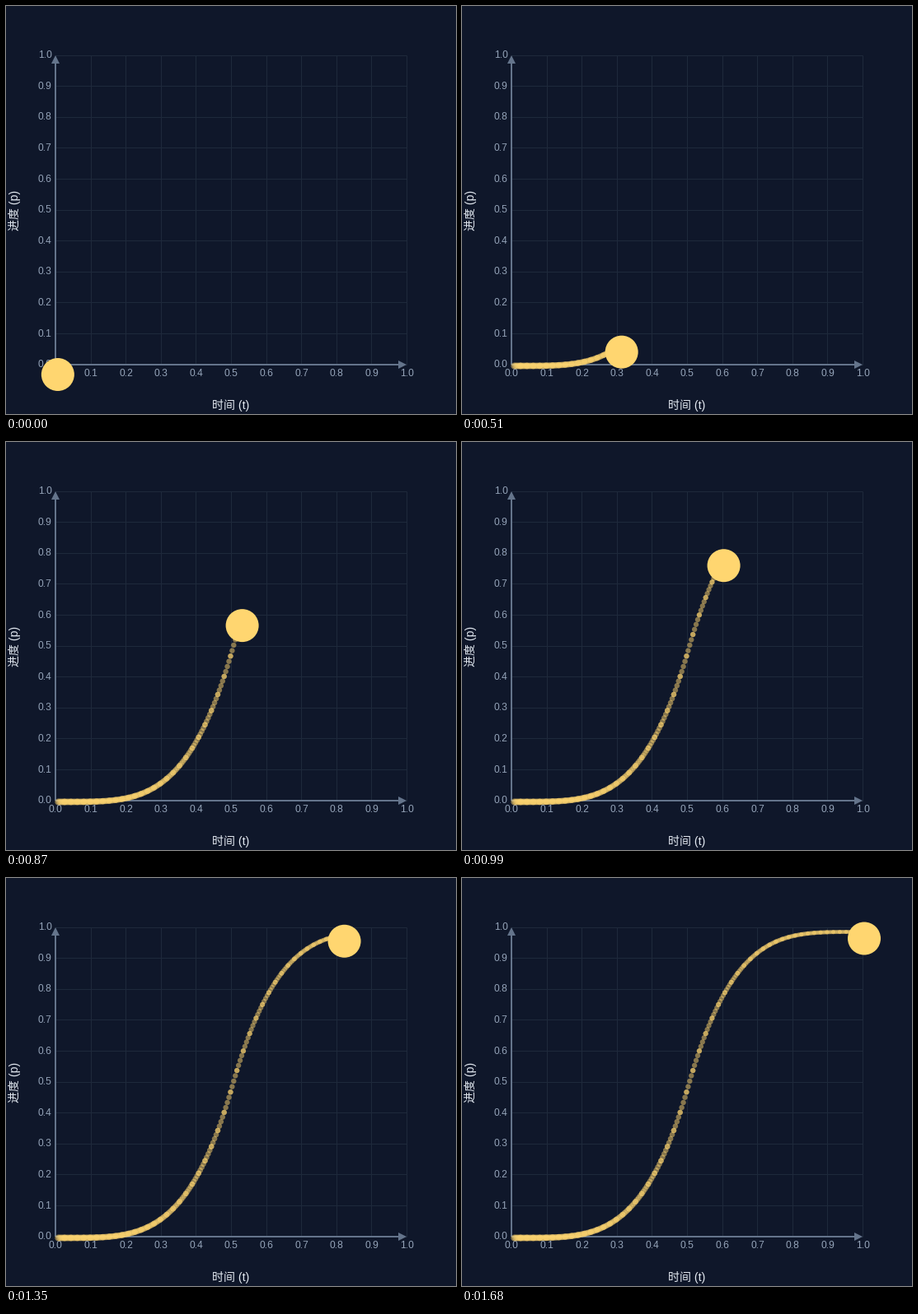
A matplotlib script that plays this animation: 546 px wide and 496 px high, repeating every 1710 ms.

```python
import numpy as np
import matplotlib.pyplot as plt
from matplotlib.animation import FuncAnimation
from matplotlib.patches import Circle, Polygon

W, H, DPI = 546, 496, 100
PX = 72 / DPI  # points per pixel
FRAMES, STEP = 57, 30
LAST = 55  # the ball arrives here and rests

BG, GRID, AXIS = "#0f172a", "#1e293b", "#64748b"
TICK, LABEL, GOLD = "#94a3b8", "#e2e8f0", "#ffd670"
LEFT, RIGHT, TOP, BOTTOM = 60, 486, 59.5, 435.5
SUB, LEAD = 4, 0.17  # trail dots per step, trail's head start in steps

plt.rcParams["font.family"] = ["Liberation Sans", "Noto Sans CJK JP"]

fig = plt.figure(figsize=(W / DPI, H / DPI), dpi=DPI, facecolor=BG)
ax = fig.add_axes([0, 0, 1, 1])
ax.set_xlim(0, W)
ax.set_ylim(H, 0)
ax.axis("off")


def ease(t):
    """Quartic ease in and out."""
    return np.where(t < 0.5, 8 * t**4, 1 - 8 * (1 - t) ** 4)


def line(xs, ys, color, width):
    ax.plot(xs, ys, color=color, lw=width * PX, solid_capstyle="butt", zorder=1)


def text(x, y, s, size, color, **kw):
    ax.text(x, y, s, fontsize=size * PX, color=color, zorder=2, **kw)


def draw_chart():
    for i in range(11):
        x = LEFT + (RIGHT - LEFT) * i / 10
        y = BOTTOM - (BOTTOM - TOP) * i / 10
        line([x, x], [TOP, BOTTOM], GRID, 1)
        line([LEFT, RIGHT], [y, y], GRID, 1)
        s = f"{i / 10:.1f}"
        text(x + 0.4, 450.4, s, 12, TICK, ha="center", va="baseline")
        text(55.5, y + 3.8, s, 12, TICK, ha="right", va="baseline")
    line([LEFT, LEFT], [436, 66], AXIS, 2)
    line([LEFT, 480], [436, 436], AXIS, 2)
    for tip in ([(60, 60), (55, 70), (65, 70)], [(486, 436), (476, 431), (476, 441)]):
        ax.add_patch(Polygon(tip, fc=AXIS, lw=0, zorder=2))
    text(273, 490, "时间 (t)", 14, LABEL, ha="center", va="baseline")
    text(10, 248, "进度 (p)", 14, LABEL, ha="center", va="center", rotation=90)


draw_chart()

# Each step leaves a run of dots, both ends included, so joints look brighter.
starts = np.arange(LAST + 1)[:, None]
t_dots = np.clip((starts + np.arange(SUB + 1) / SUB + LEAD) / LAST, 0, 1).ravel()
dots = np.column_stack([62 + 426 * t_dots, 437.5 - 372 * ease(t_dots)])
sizes = (2 * (4 - 1.6 * t_dots) * PX) ** 2

trail = ax.scatter([], [], c=GOLD, alpha=0.5, linewidths=0, zorder=3)
ball = ax.add_patch(Circle((0, 0), 20, fc=GOLD, lw=0, zorder=4))


def update(n):
    t = np.clip(n / LAST, 0.002, 1)
    ball.center = 62 + 426 * t, 448 - 374.5 * float(ease(t))
    count = min(n, LAST) * (SUB + 1)
    trail.set_offsets(dots[:count])
    trail.set_sizes(sizes[:count])
    return trail, ball


anim = FuncAnimation(fig, update, frames=FRAMES, interval=STEP, repeat=True, repeat_delay=0)
plt.show()
```
